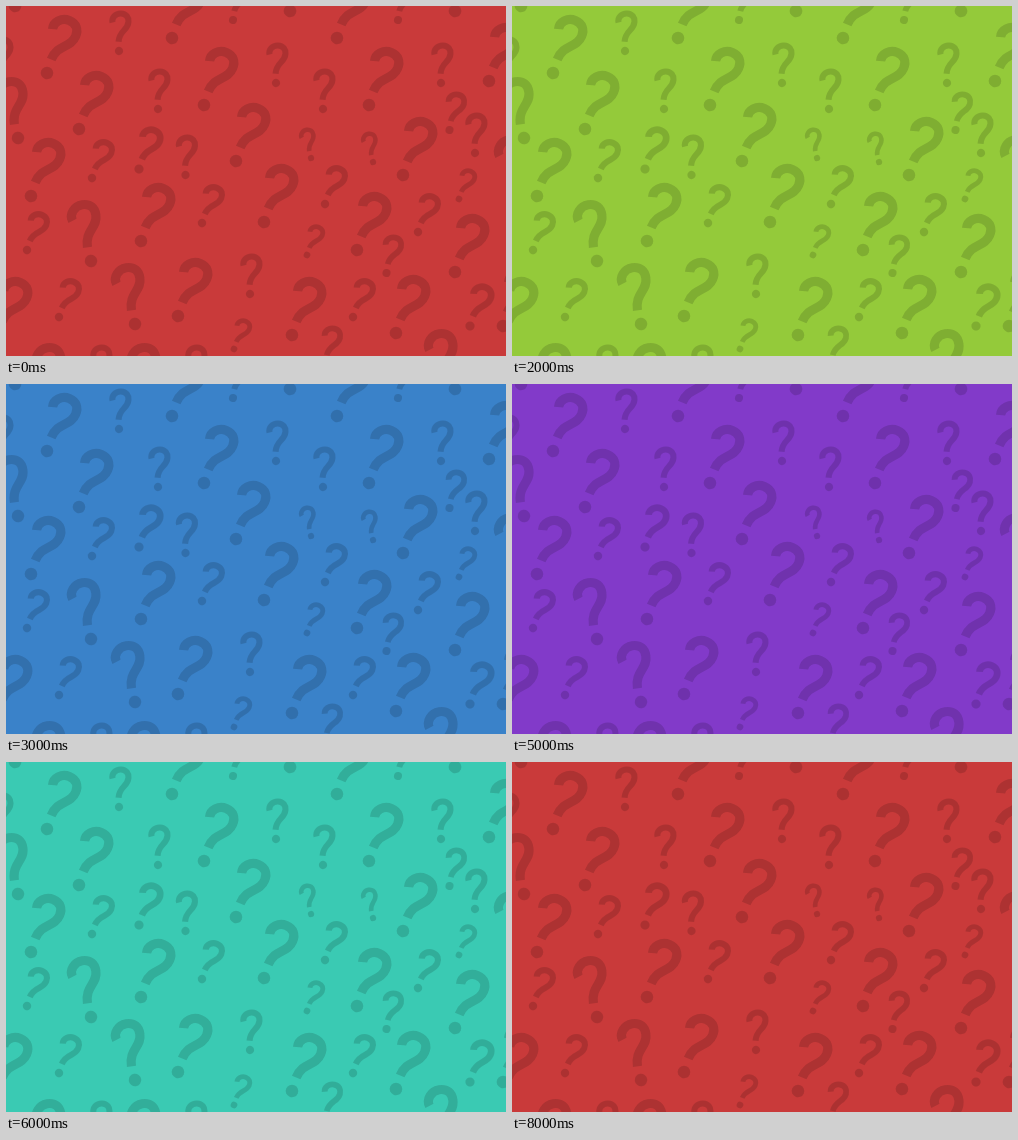
These frames come from a looping animation (500 px wide and 350 px high, 9000 ms). An HTML page with a canvas:

```html
<!DOCTYPE html>
<html lang="en">
<head>
<meta charset="utf-8">
<title>Question marks</title>
<style>
html, body { margin: 0; width: 100%; height: 100%; overflow: hidden; }
canvas { display: block; }
</style>
</head>
<body>
<canvas id="stage" width="500" height="350"></canvas>
<script>
const ctx = document.getElementById('stage').getContext('2d');
const colors = ['#c93a3a', '#c9823a', '#94ca3a', '#3a82c9', '#c93a98',
                '#823ac9', '#3acab3', '#d1cc32', '#c93a3a'];
const STEP = 1000;

// The dot sits at the origin, the hook above it.
const hook = new Path2D('M-12 -42.6C-14.4 -49.5 -8 -57 0 -57S12 -52 12 -45C12 -32 -1.4 -31 -1.4 -14');
const dot = new Path2D();
dot.arc(0, 0, 6.3, 0, Math.PI * 2);

const kind = (tilt, scale) => ({ tilt: tilt * Math.PI / 180, scale });
const big = kind(23, 1), back = kind(-9, 1);
const upright = kind(3, 0.66), lean = kind(23, 0.67), wide = kind(22, 0.73);
const soft = kind(14, 0.64), tiny = kind(23, 0.53), tinyBack = kind(-9, 0.5);

function mark({ tilt, scale }, x, y) {
  ctx.save();
  ctx.translate(x, y);
  ctx.rotate(tilt);
  ctx.scale(scale, scale);
  ctx.stroke(hook);
  ctx.fill(dot);
  ctx.restore();
}

function each(type, ...spots) {
  for (const [x, y] of spots) mark(type, x, y);
}

// Clusters recur across the pattern, placed by their first mark.
function cluster(x, y) {
  each(big, [x, y], [x + 32, y + 67], [x + 118, y - 27]);
  each(upright, [x + 104, y + 45], [x - 14, y + 71]);
  mark(soft, x + 61, y - 18);
}

function couple(x, y) {
  mark(big, x, y);
  mark(lean, x + 61, y - 18);
}

function neighbours(x, y) {
  mark(big, x, y);
  mark(upright, x + 72, y - 22);
}

function arch(x, y) {
  mark(back, x, y);
  mark(upright, x + 44, y - 19);
}

function pattern() {
  for (const [x, y] of [[9, 0], [166, 32], [331, 32]]) cluster(x, y);
  for (const [x, y] of [[25, 190], [135, 235], [258, 216], [351, 244],
                        [286, 329], [449, 266], [-8, 329]]) couple(x, y);
  for (const [x, y] of [[172, 310], [397, 169]]) neighbours(x, y);
  for (const x of [50, 145]) arch(x, 398);

  each(big, [73, 123], [230, 155], [390, 327], [483, 75], [497, 320]);
  each(back, [85, 255], [129, 318], [12, 132], [442, 384], [512, 190]);
  each(upright, [179.5, 169]);
  each(lean, [21, 244]);
  each(wide, [133, 163], [464, 320]);
  each(soft, [443.5, 124], [380.5, 267], [319.5, 358]);
  each(tiny, [301, 249], [228, 343], [453, 193]);
  each(tinyBack, [305, 152], [367, 156]);
}

function draw(now) {
  ctx.fillStyle = colors[Math.floor(now / STEP) % colors.length];
  ctx.fillRect(0, 0, 500, 350);
  ctx.fillStyle = ctx.strokeStyle = 'rgba(0, 0, 0, 0.14)';
  ctx.lineWidth = 9.2;
  pattern();
}

const start = performance.now();
function tick() {
  draw(performance.now() - start);
  requestAnimationFrame(tick);
}
tick();
</script>
</body>
</html>
```
